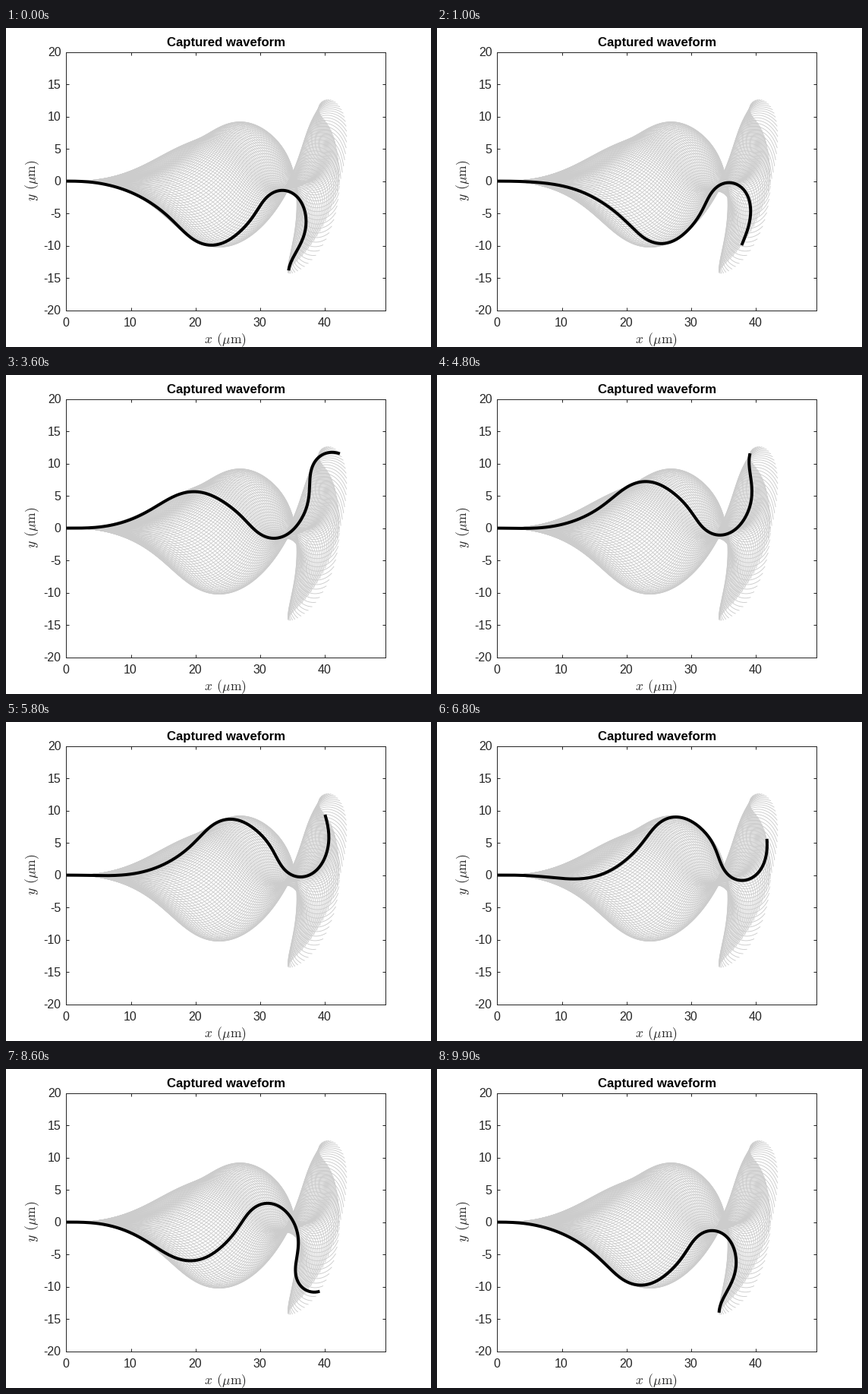
Write a matplotlib script that moves like this. It is 560 px wide and 420 px high and loops after 10000 ms.

```python
import numpy as np
import matplotlib.pyplot as plt
from matplotlib.animation import FuncAnimation
from matplotlib.collections import LineCollection

W, H = 560, 420
LEFT, RIGHT, TOP, BOTTOM = 79.4, 500.4, 31.6, 371.6
X_MAX, Y_MAX = 49.4, 20
FRAMES, INTERVAL = 100, 100
LENGTH, STEPS = 54.7, 160       # filament length in micrometres
INK = "#262626"

plt.rcParams["font.family"] = "Liberation Sans"
plt.rcParams["mathtext.fontset"] = "cm"


def profile(*values):
    """Smooth function of s in 0..1 through evenly spaced values."""
    knots = np.linspace(0, 1, len(values))
    return np.poly1d(np.polyfit(knots, values, len(values) - 1))


# The heading along the filament is a bending wave, all in degrees.
mean = profile(0, -2, 2, 4, -4, -2)
amplitude = profile(0, 26, 47, 56, 87, 113)
lag = profile(122, 147, 228, 358, 488, 584)
SKEW, SKEW_PHASE = 0.1, 133     # third harmonic that tilts the wave
SWAY = 3                        # whole-body rocking, twice per beat


def cos(deg):
    return np.cos(np.radians(deg))


def shape(phase):
    """Points of the filament, base first, at a phase from 0 to 1."""
    s = (np.arange(STEPS) + 0.5) / STEPS
    beat = 360 * phase
    theta = beat - lag(s)
    wave = cos(theta) + SKEW * cos(3 * theta + SKEW_PHASE)
    sway = SWAY * np.minimum(1, 10 * s) * cos(2 * beat)
    heading = np.radians(mean(s) + amplitude(s) * wave - sway)
    steps = np.column_stack([np.cos(heading), np.sin(heading)])
    return np.vstack([[0, 0], steps.cumsum(axis=0) * LENGTH / STEPS])


fig = plt.figure(figsize=(W / 80, H / 80), dpi=80, facecolor="white")


def px(n):
    return n * 72 / 80


def label(x, y, text, size, **kw):
    kw = {"ha": "center", "va": "baseline", "color": INK, **kw}
    fig.text(x / W, 1 - y / H, text, fontsize=px(size), **kw)


ax = fig.add_axes([LEFT / W, 1 - BOTTOM / H,
                   (RIGHT - LEFT) / W, (BOTTOM - TOP) / H])
ax.set_xlim(0, X_MAX)
ax.set_ylim(-Y_MAX, Y_MAX)
ax.set_xticks(range(0, 41, 10))
ax.set_yticks(range(-20, 21, 5))
ax.tick_params(direction="in", length=px(4), width=px(1), color=INK,
               top=True, right=True, labelbottom=False, labelleft=False)
for spine in ax.spines.values():
    spine.set(linewidth=px(1), color=INK)

for v in range(0, 41, 10):
    label(LEFT + v * (RIGHT - LEFT) / X_MAX - 0.7, 393, str(v), 16)
for v in range(-20, 21, 5):
    y = BOTTOM - (v + Y_MAX) * (BOTTOM - TOP) / (2 * Y_MAX)
    label(72.5, y + 5.5, str(v), 16, ha="right")
label(290, 24, "Captured waveform", 16.8, color="black", weight="bold")
label(289, 415, r"$x\;\,(\mu\mathrm{m})$", 17.5)
label(39.5, 201, r"$y\;\,(\mu\mathrm{m})$", 17.5,
      rotation=90, rotation_mode="anchor")

shapes = [shape(i / FRAMES) for i in range(FRAMES)]
ax.add_collection(LineCollection(shapes, colors="#cccccc",
                                 linewidths=px(0.9), zorder=1),
                  autolim=False)
line, = ax.plot([], [], color="black", lw=px(4),
                solid_capstyle="butt", solid_joinstyle="round")


def update(i):
    line.set_data(*shapes[i].T)
    return line,


anim = FuncAnimation(fig, update, frames=FRAMES, interval=INTERVAL, repeat=True)
plt.show()
```
